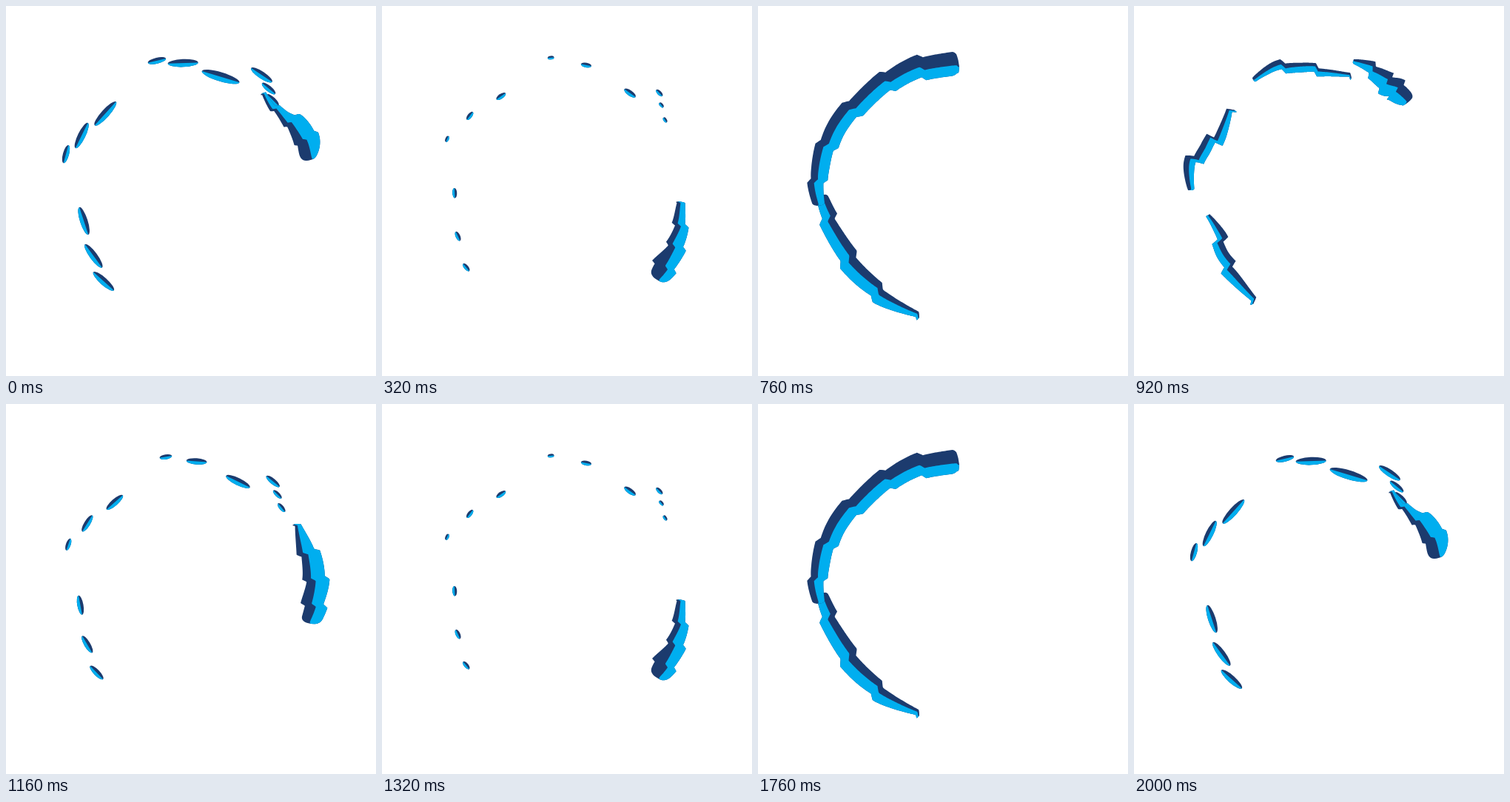
Write an HTML page with a canvas that moves like this. It is 500 px wide and 500 px high and loops after 2.08 s.

```html
<!DOCTYPE html>
<html lang="en">
<head>
<meta charset="utf-8">
<title>Splash ring</title>
<style>
html, body { margin: 0; width: 100%; height: 100%; overflow: hidden; background: #fff; }
canvas { display: block; width: 500px; height: 500px; }
</style>
</head>
<body>
<canvas id="stage" width="500" height="500"></canvas>
<script>
const ctx = document.getElementById('stage').getContext('2d');
const NAVY = '#1c3b6e', SKY = '#00aeef';
const CENTER = 245, RAD = Math.PI / 180;

function fill(color, points) {
  ctx.fillStyle = color;
  ctx.beginPath();
  points.forEach(p => ctx.lineTo(...p));
  ctx.fill();
}

// Catmull-Rom value of all node components at t in 0..1
function along(nodes, t) {
  const last = nodes.length - 1;
  const i = Math.min(last - 1, Math.floor(t * last)), f = t * last - i;
  const b = nodes[i], c = nodes[i + 1];
  const a = nodes[i - 1] || b, d = nodes[i + 2] || c;
  return b.map((v, k) => v + f / 2 * (c[k] - a[k] +
    f * (2 * a[k] - 5 * v + 4 * c[k] - d[k] + f * (3 * (v - c[k]) + d[k] - a[k]))));
}

// Slow drift to one side, then a quick step back
function tooth(phase) {
  const f = phase % 1, snap = 0.88;
  return f < snap ? 1 - 2 * f / snap : 2 * (f - snap) / (1 - snap) - 1;
}

// Two-tone stroke. Nodes: x, y, dark width to the left, light width to the right
function ribbon(teeth, amp, ...nodes) {
  const dark = [], split = [], light = [], N = 150;
  const len = nodes.slice(1).reduce((sum, n, i) =>
    sum + Math.hypot(n[0] - nodes[i][0], n[1] - nodes[i][1]), 0);
  for (let i = 0; i <= N; i++) {
    const t = i / N;
    const [x, y, left, right] = along(nodes, t);
    const p = along(nodes, Math.max(0, t - 0.01)), q = along(nodes, Math.min(1, t + 0.01));
    const dx = q[0] - p[0], dy = q[1] - p[1], size = Math.hypot(dx, dy);
    const u = Math.min(1, Math.min(t, 1 - t) * len * 2 / (left + right));
    const cap = Math.sqrt(u * (2 - u));
    const jog = amp * tooth(t * teeth);
    const at = s => [x - dy / size * s * cap, y + dx / size * s * cap];
    dark.push(at(jog - left));
    split.push(at(jog));
    light.push(at(jog + right));
  }
  light.reverse();
  fill(NAVY, [...dark, ...light]);
  fill(SKY, [...split, ...light]);
}

// Drops circling the centre: angle, radius, length, turn in degrees
const drops = [
  [131.7, 170, 37, 8.8], [143.8, 157, 39, 11.3], [162, 147, 39, 15],
  [195.3, 170, 25, 7.3], [206.1, 159, 38, 11.3], [222, 149, 43, 13.6],
  [256.5, 176, 25, 8], [268, 168, 41, 12.6], [286.8, 156, 53, 18.5],
  [303.5, 182, 34, 12], [309.5, 173, 23, 10.5], [314.5, 165, 22, 12]
];

// Drops shrink as they travel clockwise; the light half faces out below, in above
function spray(age) {
  for (const [angle, radius, length, turn] of drops) {
    if (age > 1.3 && turn < 13) continue;
    const a = (angle + turn * age) * RAD, s = 1 - 0.65 * age;
    const x = CENTER + radius * Math.cos(a), y = CENTER + radius * Math.sin(a);
    const rx = length * s / 2, ry = (2.2 + length * 0.075) * (1 - 0.4 * age) * Math.min(1, s * 3);
    const heading = a + (angle < 180 ? -1 : 1) * Math.PI / 2;
    [[NAVY, 2], [SKY, 1]].forEach(([color, part]) => {
      ctx.fillStyle = color;
      ctx.beginPath();
      ctx.ellipse(x, y, rx, ry, heading, 0, Math.PI * part);
      ctx.fill();
    });
  }
}

const poses = [
  () => {
    spray(0);
    ribbon(4, -2, [415, 207, 16, 8], [406, 184, 15, 18], [390, 164, 10, 18],
      [374, 149, 6, 9], [358, 134, 4, 5], [346, 118, 3, 3]);
  },
  () => {
    spray(0.5);
    ribbon(4, -3, [412, 297, 12, 14], [416, 270, 15, 16], [415, 235, 12, 19],
      [404, 200, 9, 16], [390, 162, 3, 4]);
  },
  () => {
    spray(1);
    ribbon(4, -2.5, [375, 372, 14, 10], [385, 352, 19, 13], [395, 322, 9, 15],
      [402, 294, 8, 10], [401, 264, 5, 6]);
  },
  () => {
    spray(1.2);
    ribbon(5, -2.5, [164, 386, 14, 12], [205, 396, 15, 18], [262, 403, 13, 20],
      [325, 390, 11, 18], [365, 364, 8, 12], [390, 341, 3, 4]);
  },
  () => {
    spray(1.42);
    ribbon(5, -2.5, [85, 244, 20, 12], [86, 282, 23, 12], [112, 328, 17, 19],
      [158, 373, 9, 26], [212, 401, 9, 24], [252, 403, 6, 13], [290, 395, 5, 6]);
  },
  () => {
    ribbon(4, 3, [88, 255, 8, 8], [97, 290, 10, 12], [125, 345, 12, 14],
      [165, 388, 9, 13], [218, 421, 3, 4]);
    ribbon(6, 2.5, [80, 270, 8, 8], [80, 225, 10, 14], [105, 165, 13, 14],
      [160, 112, 14, 14], [215, 86, 17, 14], [272, 82, 19, 14]);
  },
  () => {
    ribbon(3, 4, [103, 281, 3, 3], [114, 310, 8, 6], [121, 338, 8, 9],
      [135, 364, 8, 9], [162, 402, 3, 4]);
    ribbon(3, 5, [73, 249, 5, 4], [78, 214, 8, 8], [98, 190, 8, 9],
      [115, 172, 6, 9], [135, 140, 4, 4]);
    ribbon(3, 3, [160, 98, 4, 3], [193, 83, 7, 6], [228, 82, 5, 8],
      [260, 88, 4, 6], [294, 97, 3, 2]);
    ribbon(4, 3, [297, 72, 3, 3], [324, 86, 8, 11], [343, 103, 12, 17],
      [356, 114, 14, 16], [368, 132, 12, 12]);
  }
];

const LOOP = 2080;
const cuts = [0, 160, 320, 480, 600, 760, 920, 1040, 1160, 1320, 1480, 1600, 1760, 1920, 2000];
const start = performance.now();
let shown = -1;

function tick(now) {
  const t = Math.max(0, now - start) % LOOP;
  const step = cuts.filter(c => c <= t).length - 1;
  if (step !== shown) {
    shown = step;
    ctx.clearRect(0, 0, 500, 500);
    poses[step % poses.length]();
  }
  requestAnimationFrame(tick);
}
tick(start);
</script>
</body>
</html>
```
